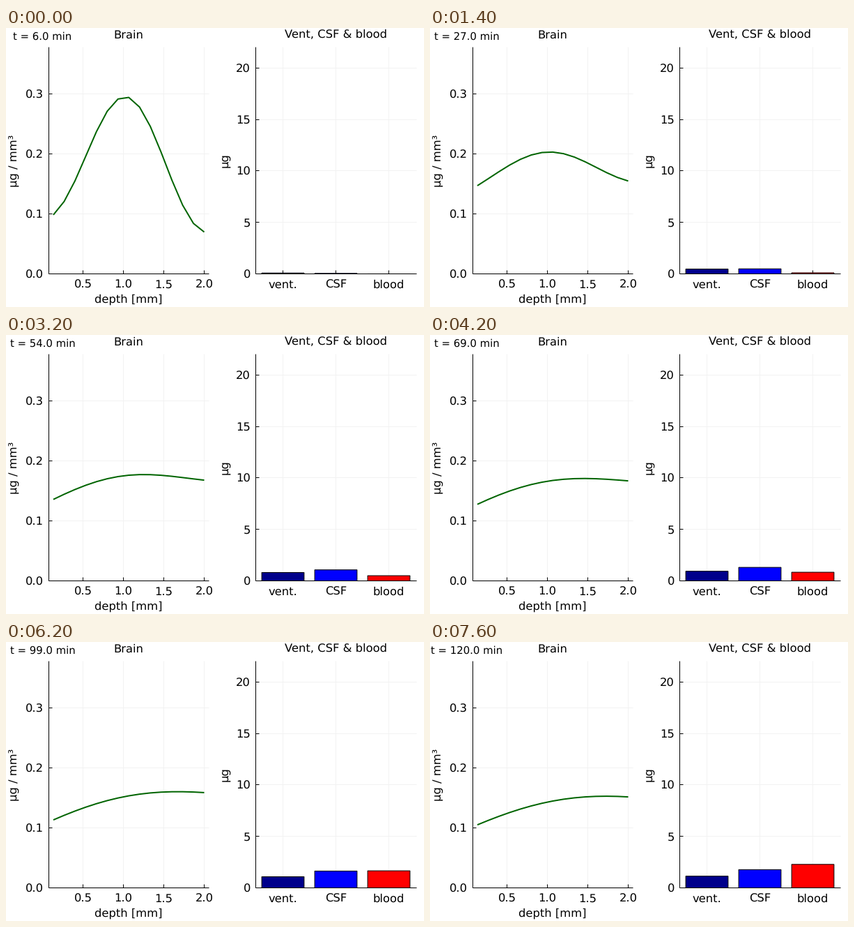
Write a matplotlib script that moves like this. It is 600 px wide and 400 px high and loops after 7800 ms.

```python
import numpy as np
import matplotlib.pyplot as plt
from matplotlib.animation import FuncAnimation
from matplotlib.patches import Rectangle

W, H, DPI = 600, 400, 100
FRAMES, INTERVAL = 39, 200
PX = 72 / DPI
TOP, BASE = 27.5, 352.5

plt.rcParams["font.family"] = "DejaVu Sans"
plt.rcParams["text.hinting"] = "no_hinting"

depth = np.arange(1, 16) * 2 / 15
z = np.linspace(-1, 1, 15)


def bell(k):
    """Even mode: 0 at mid depth, 1 at both ends."""
    return (1 - np.cos(k * z)) / (1 - np.cos(k))


def tilt(k):
    """Odd mode: -1 at the left end, 1 at the right end."""
    return np.sin(k * z) / np.sin(k)


def concentration(t):
    """Slowly cleared level plus diffusion modes that decay over time."""
    clear = np.exp(-.00273 * t)
    c = clear * (.201 + .0366 * tilt(.6))
    c -= .021 * np.exp(-t / 480) * bell(1)
    c += .185 * np.exp(-.065 * t) * (.51 - bell(2.7))
    c += .288 * np.exp(-.25 * t) * (.51 - bell(3.5))
    c -= .0583 * np.exp(-.0245 * t) * tilt(1.4)
    c -= .013 * np.exp(-.17 * t) * np.sin(np.pi * z)
    return c


def uptake(t, limit, rate, power):
    return limit * (1 - np.exp(-rate * t)) ** power


def depth_x(d):
    return 52.5 + 116 * d


def conc_y(c):
    return BASE - 859.3 * c


def amount_y(a):
    return BASE - 14.76 * a


fig = plt.figure(figsize=(W / DPI, H / DPI), dpi=DPI, facecolor="white")
ax = fig.add_axes([0, 0, 1, 1])
ax.set(xlim=(0, W), ylim=(H, 0))
ax.axis("off")


def rule(x0, y0, x1, y1, color="black", order=2):
    # Half a pixel back, so that snapping lands on the pixel centre
    ax.plot([x0 - .5, x1 - .5], [y0 - .5, y1 - .5], color=color, lw=PX,
            zorder=order, solid_capstyle="butt")


def text(x, y, s, size=16.4, ha="center", angle=0):
    return ax.text(x, y, s, fontsize=size * PX, ha=ha, va="baseline",
                   rotation=angle, rotation_mode="anchor", zorder=5)


def panel(left, right, xticks, yticks, title, ylabel, label_x):
    for x, s in xticks:
        rule(x, TOP, x, BASE, "#f2f2f2", 1)
        rule(x, BASE, x, BASE - 5)
        text(x, 372.7, s)
    for y, s in yticks:
        rule(left, y, right, y, "#f2f2f2", 1)
        rule(left, y, left + 5, y)
        text(left - 7.5, y + 6, s, ha="right")
    rule(left, TOP, left, BASE)
    rule(left, BASE, right, BASE)
    text((left + right) / 2, 14.3, title)
    text(label_x, 190, ylabel, angle=90)


panel(61.5, 291,
      [(depth_x(d), f"{d:.1f}") for d in (.5, 1, 1.5, 2)],
      [(conc_y(c), f"{c:.1f}") for c in (0, .1, .2, .3)],
      "Brain", "µg / mm³", 16.5)
text(176, 393.3, "depth [mm]")

# name, colour, (limit, rate, power) of the uptake
compartments = [("vent.", "#00008b", (1.22, .025, 1.35)),
                ("CSF", "#0000ff", (2, .0227, 1.8)),
                ("blood", "#ff0000", (8, .00825, 2.7))]
centers = [397.5 + 76 * i for i in range(3)]
panel(358.5, 589,
      [(x, name) for x, (name, *_) in zip(centers, compartments)],
      [(amount_y(a), str(a)) for a in range(0, 21, 5)],
      "Vent, CSF & blood", "µg", 319)

curve, = ax.plot(depth_x(depth), conc_y(concentration(6)), color="#006400",
                 lw=2 * PX, zorder=4, solid_capstyle="butt")
clock = text(52.5, 16.8, "", 14.9)
bars = [ax.add_patch(Rectangle((x - 30.4, BASE), 60.8, 0, facecolor=color,
                               edgecolor="black", lw=PX, zorder=3, snap=False))
        for x, (_, color, _) in zip(centers, compartments)]


def update(k):
    t = 6 + 3 * k
    clock.set_text(f"t = {t:.1f} min")
    curve.set_ydata(conc_y(concentration(t)))
    for bar, (_, _, law) in zip(bars, compartments):
        bar.set_height(amount_y(uptake(t, *law)) - BASE)
    return [clock, curve, *bars]


anim = FuncAnimation(fig, update, frames=FRAMES, interval=INTERVAL,
                     repeat=True, repeat_delay=0, blit=False)
plt.show()
```
